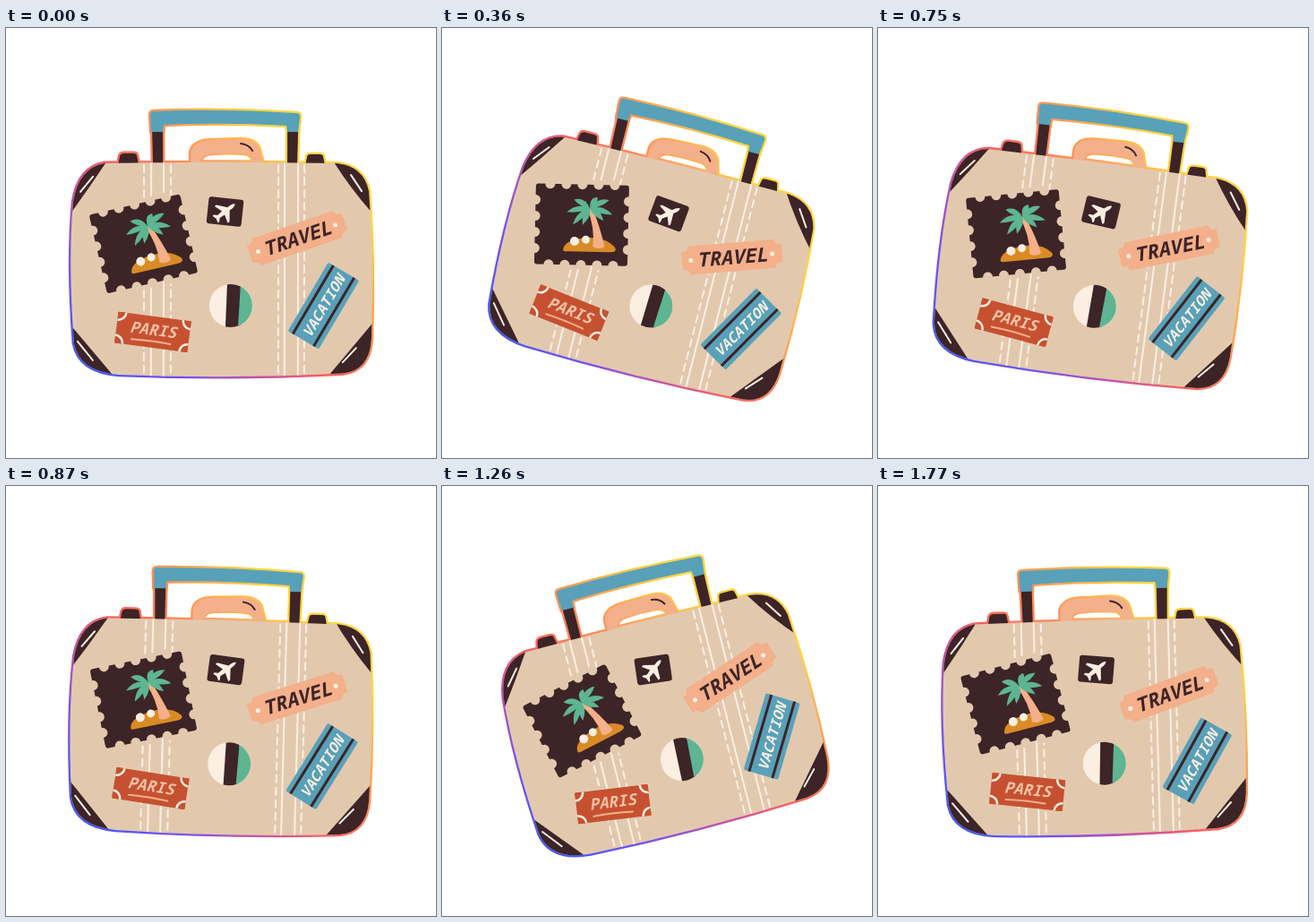
Recreate the animation shown at these times as an HTML page. Size 480 px wide and 480 px high, loop 1.8 s.

```html
<!DOCTYPE html>
<html lang="en">
<head>
<meta charset="utf-8">
<title>Swinging suitcase</title>
<style>
  html, body { margin: 0; width: 100%; height: 100%; overflow: hidden; background: #fff; }
  svg { display: block; width: 100%; height: 100%; }
  text { font: italic 700 22px "Noto Sans Mono", "DejaVu Sans Mono", monospace; text-anchor: middle; }
  .dark { fill: #3d2427; }
  .blue { fill: #58a1b9; }
  .peach { fill: #f3b08a; }
  .cream { fill: #fcefe2; }
  .green { fill: #5db592; }
  .line { fill: none; stroke: #fcefe2; stroke-width: 2; stroke-linecap: round; }
  .rim { fill: none; stroke: url(#glow); stroke-width: 4.6; stroke-linejoin: round; }
</style>
</head>
<body>
<svg viewBox="0 0 480 480">
  <defs>
    <linearGradient id="glow" gradientUnits="userSpaceOnUse" x1="90" y1="390" x2="365" y2="115">
      <stop offset="0" stop-color="#3f58ff"/>
      <stop offset=".2" stop-color="#7a50ee"/>
      <stop offset=".37" stop-color="#cf529e"/>
      <stop offset=".49" stop-color="#fb605f"/>
      <stop offset=".67" stop-color="#ff9656"/>
      <stop offset=".88" stop-color="#ffd640"/>
    </linearGradient>
    <path id="body" d="M110 151Q240 149 369 151Q399 154 405 182Q411 260 408 347Q406 382 376 385.500Q250 392 126 387Q82 384 76 352Q69 260 75 194Q81 156 110 151Z"/>
    <path id="bar" d="M165 93Q245 90 324 95Q328 95 328 99L326 116H314L313 109Q244 105 176 108L175 116H162L161 97Q161 93 165 93Z"/>
    <path id="legs" d="M163 115H175V152H164ZM314 115H326L325 152H314Z"/>
    <path id="feet" d="M125 153L127 143Q128 140 132 140H142Q146 140 146 143L148 153ZM334 153L336 144Q336 141 340 141H350Q354 141 354 144L356 153Z"/>
    <path id="grip" d="M206 151V141Q206 133 213 129Q218 125 235 125L262 124Q277 124 282 133L287 151Z"/>
    <path id="hole" d="M219 148Q220 142 230 141.500Q247 140 265 141.500Q272 142 274 148Z"/>
    <clipPath id="inBody"><use href="#body"/></clipPath>
    <clipPath id="disc"><circle cx="251" cy="310" r="24"/></clipPath>
    <clipPath id="ticket"><rect x="-41" y="-17.5" width="82" height="35" rx="1"/></clipPath>
  </defs>

  <g id="case">
    <g class="rim">
      <use href="#body"/><use href="#bar"/><use href="#legs"/><use href="#feet"/><use href="#grip"/>
    </g>
    <use href="#legs" class="dark"/>
    <use href="#bar" class="blue"/>
    <use href="#feet" class="dark"/>
    <use href="#grip" class="peach"/>
    <use href="#hole" fill="#fff" stroke="url(#glow)" stroke-width="1.5"/>
    <path d="M262 129Q271 130 275 137" fill="none" stroke="#3d2427" stroke-width="2" stroke-linecap="round"/>
    <use href="#body" fill="#e2c9ae"/>

    <g clip-path="url(#inBody)">
      <path class="line" d="M162 150V390M176 150V390M311 150V390M326 150V390"/>
      <path class="line" stroke-dasharray="8 6" d="M154 153V390M184 153V390M304 153V390M333 153V390"/>
      <path class="dark" d="M115 145Q94 177 70 210V145ZM363 145Q384 179 412 210V145ZM69 328L124 393H69ZM413 325L356 393H413Z"/>
    </g>
    <path class="line" d="M83 183L97 166M385 164L397 182M80 350L97 371M376 373L391 357"/>

    <g transform="translate(153.5 241) rotate(-13)">
      <rect class="dark" x="-52" y="-45" width="104" height="90" rx="3"/>
      <path d="M-36-45H36.100M-36 45H36.100M-52-27V27.100M52-27V27.100" fill="none" stroke="#e2c9ae" stroke-width="11" stroke-linecap="round" stroke-dasharray="0 18"/>
      <path d="M-20 27Q-18 18 0 15Q26 11 38 25Q40 30 32 30H-17Q-21 30-20 27Z" fill="#d98b25"/>
      <path class="peach" d="M6-18H12Q21 3 26 24Q19 28 13 24Q15 3 6-18Z"/>
      <path id="palm" class="green"/>
      <circle class="cream" cx="-7.5" cy="18.5" r="5"/>
      <circle class="cream" cx="5" cy="16.5" r="4.5"/>
    </g>

    <g transform="translate(244.5 205) rotate(6)">
      <rect class="dark" x="-19.500" y="-15" width="39" height="30" rx="3"/>
      <path class="cream" transform="rotate(46)" d="M0-14Q2.500-12 2-5L12 3V5.500L2.500 2.500L2 9L5 12V14L0 12.500L-5 14V12L-2 9L-2.500 2.500L-12 5.500V3L-2-5Q-2.500-12 0-14Z"/>
    </g>

    <g transform="translate(325 234.500) rotate(-19)">
      <path class="peach" d="M-48-16H48Q48-10 56-10V10Q48 10 48 16H-48Q-48 10-56 10V-10Q-48-10-48-16Z"/>
      <circle class="cream" cx="-46" r="2.500"/>
      <circle class="cream" cx="45" r="2.500"/>
      <text class="dark" y="8">TRAVEL</text>
    </g>

    <g transform="translate(354.500 310) rotate(-59.500)">
      <rect class="blue" x="-44.500" y="-20" width="89" height="40" rx="2"/>
      <path d="M-44.500-13.500H44.500M-44.500 13.500H44.500" stroke="#3d2427" stroke-width="3"/>
      <text class="cream" y="6" style="font-size:16px">VACATION</text>
    </g>

    <g transform="translate(164 339.500) rotate(7.500)" clip-path="url(#ticket)">
      <rect x="-42" y="-18" width="84" height="36" fill="#c65131"/>
      <g id="corners" fill="#c65131" stroke="#fcefe2" stroke-width="2.500"></g>
      <text y="3.500" fill="#f5c3a5" style="font-size:17.500px">PARIS</text>
      <path d="M-23 11Q0 9.500 21 11" fill="none" stroke="#f3b08a" stroke-width="2" stroke-linecap="round"/>
    </g>

    <g clip-path="url(#disc)">
      <rect class="cream" x="227" y="286" width="48" height="48"/>
      <path class="dark" d="M247 285H262V335H245Z"/>
      <path class="green" d="M262 285H276V335H259Z"/>
    </g>
  </g>
</svg>
<script>
const $ = id => document.getElementById(id);

// Palm fronds: pointed, drooping leaves fanning out from the top of the trunk.
const [cx, cy] = [9, -18];
const tips = [[-17, -14], [-9, -28], [17, -31], [30, -28], [34, -12], [-10, 0], [24, -5], [1, 0]];
$('palm').setAttribute('d', tips.map(([x, y]) => {
  const mx = (x + cx) / 2, my = (y + cy) / 2 - 3;
  const len = Math.hypot(x - cx, y - cy);
  const nx = (cy - y) / len * 6.5, ny = (x - cx) / len * 6.5;
  return `M${cx} ${cy}Q${mx + nx} ${my + ny} ${x} ${y}Q${mx - nx} ${my - ny} ${cx} ${cy}`;
}).join(''));

$('corners').innerHTML = [-1, 1].flatMap(x => [-1, 1].map(y =>
  `<circle cx="${x * 41}" cy="${y * 17.5}" r="9"/>`)).join('');

const start = performance.now();
function draw(now) {
  const phase = Math.max(0, now - start) % 1800 / 1800;
  const angle = 15 * Math.sin(2 * Math.PI * phase);
  $('case').setAttribute('transform', `rotate(${angle} 240 240)`);
  requestAnimationFrame(draw);
}
draw(start);
</script>
</body>
</html>
```
